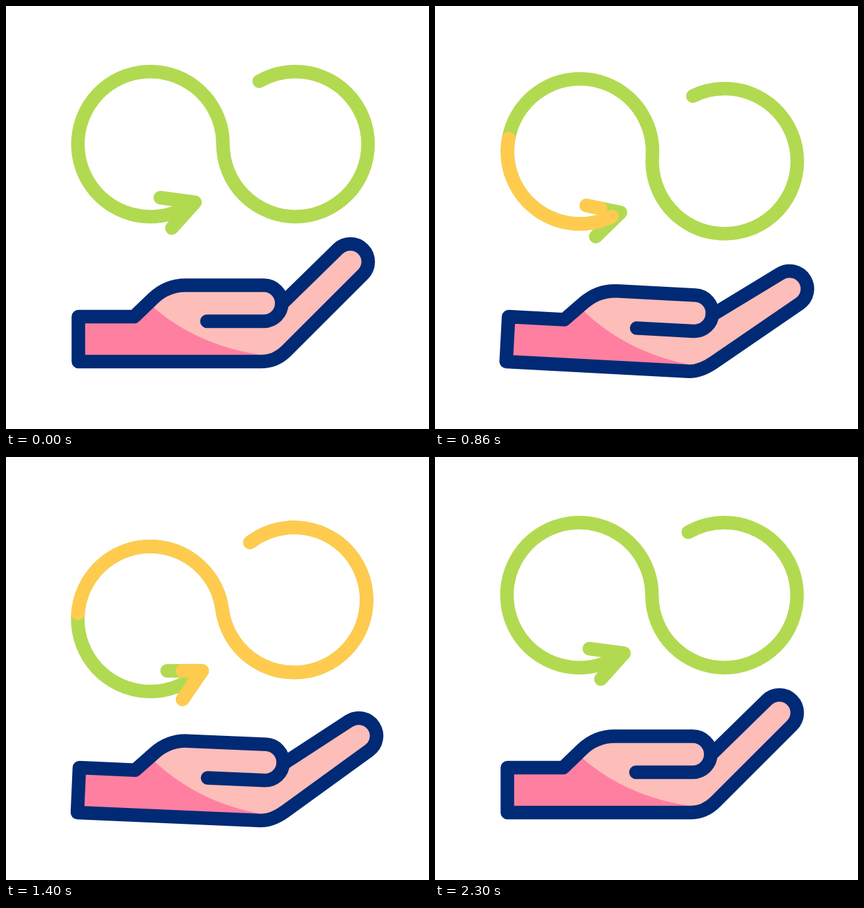
These frames come from a looping animation (640 px wide and 640 px high, 2.7 s). An HTML page with a canvas:

```html
<!DOCTYPE html>
<html lang="en">
<head>
<meta charset="utf-8">
<title>Endless care</title>
<style>
  html, body { margin: 0; width: 100%; height: 100%; overflow: hidden; background: #fff; }
  canvas { display: block; width: 640px; height: 640px; }
</style>
</head>
<body>
<canvas id="stage" width="640" height="640"></canvas>
<script>
const ctx = document.getElementById('stage').getContext('2d');
const LOOP = 2700;
const RAD = Math.PI / 180;
const GREEN = '#b1da51', YELLOW = '#ffcb4f', NAVY = '#002a75';
const SKIN = '#fdbdb9', WRIST = '#ff7fa1';

const clamp = (v, lo = 0, hi = 1) => Math.min(hi, Math.max(lo, v));
const mix = (a, b, k) => a + (b - a) * k;
const ease = u => u * u * (3 - 2 * u);

// Eased value between keys at the given times.
function track(t, times, values) {
  if (t <= times[0]) return values[0];
  for (let i = 1; i < times.length; i++) {
    if (t < times[i]) {
      const u = (t - times[i - 1]) / (times[i] - times[i - 1]);
      return mix(values[i - 1], values[i], ease(u));
    }
  }
  return values[values.length - 1];
}

const BOB = [200, 650, 1140, 1630, 2160];
const TILT = [200, 770, 1240, 1715, 2300];

function pivot(x, y, deg, dy = 0) {
  ctx.translate(x, y + dy);
  ctx.rotate(deg * RAD);
  ctx.translate(-x, -y);
}

// Part a..b of the double loop, measured from the arrow end.
function loopPart(a, b) {
  const R = 109.75, half = 300, d0 = a * 600, d1 = b * 600;
  ctx.beginPath();
  if (d0 < half) {
    ctx.arc(218.5, 209, R, (60 + d0) * RAD, (60 + Math.min(d1, half)) * RAD);
  }
  if (d1 > half) {
    const from = Math.max(d0, half) - half;
    ctx.arc(438, 209, R, (180 - from) * RAD, (180 - (d1 - half)) * RAD, true);
  }
  ctx.stroke();
}

const BARBS = [[233.5, 290], [286, 297], [251, 336]];

function barbAt(k) {
  const i = k < 0.5 ? 0 : 1, u = k * 2 - i;
  const p = BARBS[i], q = BARBS[i + 1];
  return [mix(p[0], q[0], u), mix(p[1], q[1], u)];
}

function barbPart(a, b) {
  ctx.beginPath();
  ctx.moveTo(...barbAt(a));
  if (a < 0.5 && b > 0.5) ctx.lineTo(...BARBS[1]);
  ctx.lineTo(...barbAt(b));
  ctx.stroke();
}

function drawLoop(t) {
  ctx.save();
  pivot(328.25, 218, track(t, TILT, [0, 6.1, -16.6, 17.4, 0]), track(t, BOB, [0, 31.3, -1.3, 40.5, 0]));
  const head = ease(clamp((t - 643) / 737));
  const tail = ease(clamp((t - 1140) / 862));
  ctx.strokeStyle = GREEN;
  loopPart(0, 1);
  barbPart(0, 1);
  if (head > 0 && tail < 1) {
    ctx.strokeStyle = YELLOW;
    loopPart(tail, head);
    barbPart(tail, head);
  }
  ctx.restore();
}

function handPath(cx, cy) {
  const r = 27, jx = 417, jy = 451, kx = 424, ky = 522, base = 538;
  // Both finger sides are tangents to the fingertip circle.
  const slope = (x, y, side) => {
    const dx = cx - x, dy = y - cy;
    return Math.atan2(dy, dx) + side * Math.asin(r / Math.hypot(dx, dy));
  };
  const up = slope(jx, jy, 1), low = slope(kx, ky, -1);
  ctx.beginPath();
  ctx.moveTo(109.5, 470);
  ctx.lineTo(194, 470);
  ctx.lineTo(222, 443);
  ctx.quadraticCurveTo(243, 422.5, 272, 422.5);
  ctx.lineTo(390, 422.5);
  ctx.arc(390, 449.75, 27.25, -Math.PI / 2, 0);
  ctx.lineTo(jx, jy);
  ctx.arc(cx, cy, r, -Math.PI / 2 - up, Math.PI / 2 - low);
  ctx.lineTo(kx, ky);
  ctx.quadraticCurveTo(kx - (base - ky) / Math.tan(low), base, 386, base);
  ctx.lineTo(109.5, base);
  ctx.closePath();
}

function drawHand(t) {
  const tipX = 521 + track(t, BOB, [0, 26.5, -13, 26.5, 0]);
  const tipY = 387 + track(t, BOB, [0, 32, -2.3, 32, 0]);
  ctx.save();
  pivot(109.5, 504, track(t, BOB, [0, 7.15, -3.2, 7.2, 0]));

  ctx.save();
  handPath(tipX, tipY);
  ctx.fillStyle = SKIN;
  ctx.fill();
  ctx.clip();
  ctx.beginPath();
  ctx.moveTo(100, 447);
  ctx.lineTo(213, 447);
  ctx.quadraticCurveTo(287, 516, 395, 529);
  ctx.lineTo(395, 545);
  ctx.lineTo(100, 545);
  ctx.fillStyle = WRIST;
  ctx.fill();
  ctx.restore();

  ctx.strokeStyle = NAVY;
  handPath(tipX, tipY);
  ctx.stroke();
  ctx.beginPath();
  ctx.arc(390, 449.75, 27.25, 0, Math.PI / 2);
  ctx.lineTo(304, 477);
  ctx.stroke();
  ctx.restore();
}

function draw(t) {
  ctx.fillStyle = '#fff';
  ctx.fillRect(0, 0, 640, 640);
  ctx.lineWidth = 20.5;
  ctx.lineCap = ctx.lineJoin = 'round';
  drawLoop(t);
  drawHand(t);
}

const start = performance.now();
function tick(now) {
  draw(Math.max(0, now - start) % LOOP);
  requestAnimationFrame(tick);
}
draw(0);
requestAnimationFrame(tick);
</script>
</body>
</html>
```
